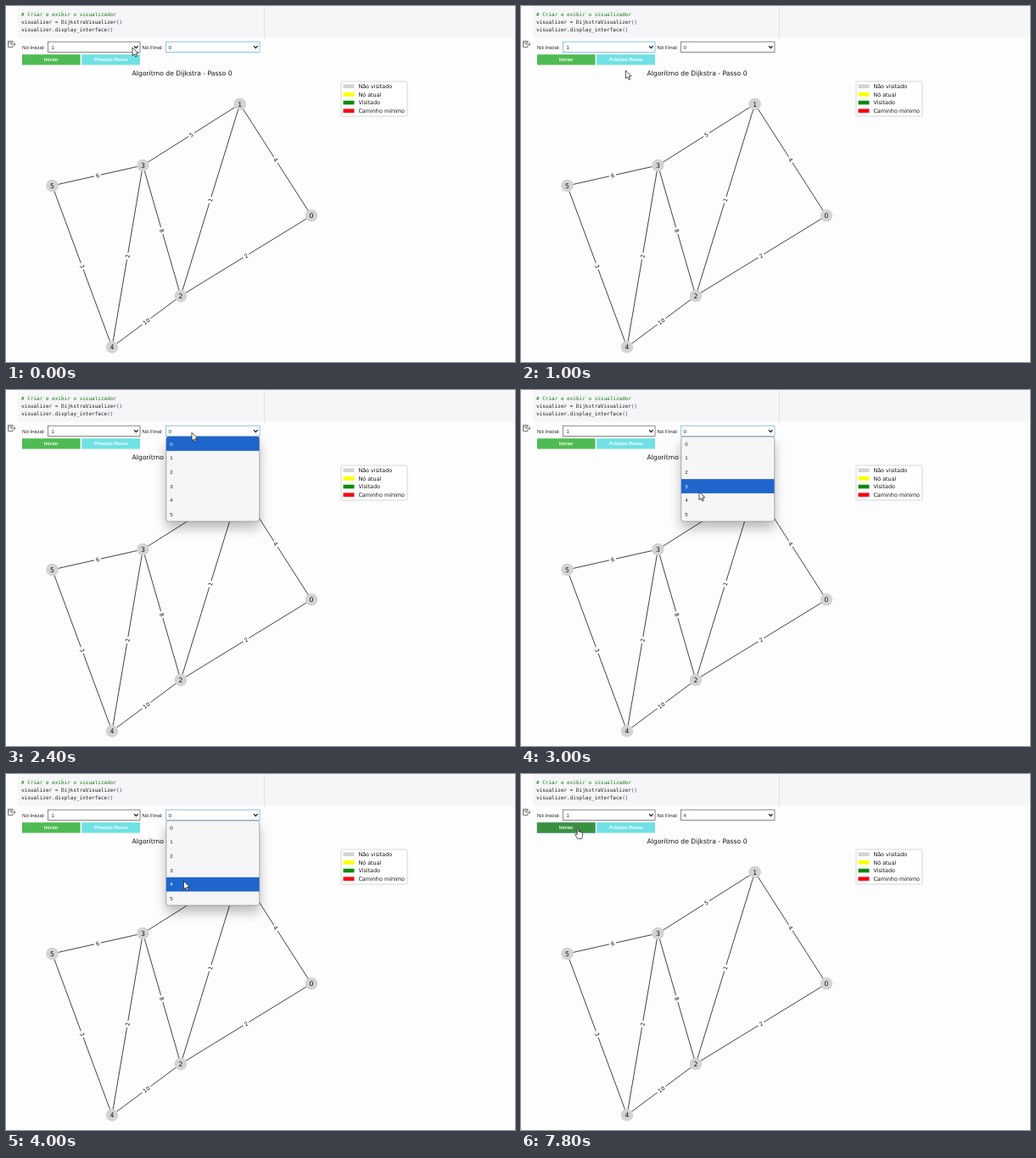
An HTML page that plays this animation: 600 px wide and 420 px high, repeating every 8 s.

```html
<!DOCTYPE html>
<html lang="pt">
<head>
<meta charset="utf-8">
<title>Algoritmo de Dijkstra</title>
<style>
  html, body { margin: 0; width: 100%; height: 100%; overflow: hidden; background: #fefdfe; }
  svg { display: block; width: 600px; height: 420px; }
  text { white-space: pre; }
  .code { font: 6px "DejaVu Sans Mono", monospace; fill: #1c1c1c; }
  .ui { font: 6.15px "Liberation Sans", Arial, sans-serif; fill: #222; }
  .label { font: bold 5.5px "Liberation Sans", Arial, sans-serif; fill: #fff; text-anchor: middle; }
  .plot { font: 7.7px "DejaVu Sans", sans-serif; fill: #111; }
  .small { font-size: 6.42px; }
  .mid { text-anchor: middle; }
  .box { fill: #fff; stroke: #6c6c6c; stroke-width: .8; }
  .box.focus { stroke: #6fb9d8; }
  .chevron { fill: none; stroke: #111; stroke-width: 1.2; }
  .icon { fill: none; stroke: #555; stroke-width: .8; }
  .menu { filter: drop-shadow(0 8px 6.5px rgba(0, 0, 0, .26)); }
  .pointer { fill: #fff; stroke: #222; stroke-width: .8; stroke-linejoin: round; }
  #start { fill: #4fbb53; }
  #start.hover { filter: drop-shadow(0 .8px .8px rgba(0, 0, 0, .45)); }
  #start.pressed { fill: #399140; stroke: #5f9f8c; stroke-width: .7; }
</style>
</head>
<body>
<svg viewBox="0 0 600 420">
  <defs>
    <clipPath id="round"><rect x="0" y="55" width="110" height="100" rx="3"/></clipPath>
  </defs>

  <rect x="14" width="586" height="37.5" fill="#f6f5f7"/>
  <path d="M304.5 0V37.5" stroke="#e2e1e4"/>
  <g class="code">
    <text x="18" y="12.2" fill="#0b800b" style="fill:#0b800b"># Criar e exibir o visualizador</text>
    <text x="18" y="21.2">visualizer = DijkstraVisualizer<tspan fill="#2a4488">()</tspan></text>
    <text x="18" y="30.2">visualizer.display_interface<tspan fill="#2a4488">()</tspan></text>
  </g>
  <path class="icon" d="M8 43V41.5H2.5V48.5H8V47M2.5 43.3H8M5 45.2H11M9.2 43.5L11 45.2L9.2 47"/>

  <g class="ui">
    <text x="19" y="50.6">Nó Inicial:</text>
    <text x="160.5" y="50.6">Nó Final:</text>
    <rect id="from" class="box" x="49.4" y="42.2" width="108.6" height="12.2"/>
    <rect id="to" class="box" x="188.4" y="42.2" width="110.6" height="12.2"/>
    <text x="53.5" y="50.6">1</text>
    <text id="goal" x="191.5" y="50.6">0</text>
    <path class="chevron" d="M151 47.2l2.3 2.5l2.3-2.5M292 47.2l2.3 2.5l2.3-2.5"/>
  </g>
  <rect id="start" x="19" y="57.2" width="68.6" height="12.3"/>
  <rect x="89.2" y="57.2" width="68.8" height="12.3" fill="#70e1e4"/>
  <text class="label" x="53.2" y="65.2">Iniciar</text>
  <text class="label" x="123.8" y="65.2">Próximo Passo</text>

  <text class="plot mid" x="207.5" y="81.6">Algoritmo de Dijkstra - Passo 0</text>
  <g id="edges"></g>
  <g id="nodes"></g>
  <rect x="395" y="89" width="78" height="41" rx="1.5" fill="#fff" stroke="#ccc" stroke-width=".8"/>
  <g id="legend"></g>

  <g id="menu" class="menu">
    <rect x="0" y="55" width="110" height="100" rx="3" fill="#f6f5f8" stroke="#8a8a8e" stroke-width=".7"/>
    <g clip-path="url(#round)"><rect id="bar" width="110" height="16.8" fill="#1f66cc"/></g>
    <g id="options" class="ui"></g>
  </g>

  <path id="arrow" class="pointer" d="M0 0V9.6L2.2 7.6L3.8 11L5.4 10.3L3.9 7L6.8 6.8Z"/>
  <path id="hand" class="pointer" d="M-.9 .8Q0-.6 .9 .8V4.6Q2-.0 2.6 5Q3.8 3.6 4.2 5.5Q5.6 4.6 5.6 6.6V9Q5.4 10.8 4.4 12.6H-.2Q-1.6 10.6-3.4 7.8Q-3.2 6.2-.9 8Z"/>
</svg>
<script>
  const $ = id => document.getElementById(id);
  const NS = "http://www.w3.org/2000/svg";

  function add(parent, tag, attrs, content = "") {
    const el = document.createElementNS(NS, tag);
    for (const key in attrs) el.setAttribute(key, attrs[key]);
    el.textContent = content;
    parent.append(el);
    return el;
  }

  // Graph: node centres and [a, b, weight]
  const nodes = [[360, 247.4], [275.7, 115.7], [206, 342], [161.4, 188], [125, 402.4], [54.5, 212]];
  const edges = [[0, 1, 4], [0, 2, 2], [1, 2, 1], [1, 3, 5], [2, 3, 8], [2, 4, 10], [3, 4, 2], [3, 5, 6], [4, 5, 3]];

  for (const [a, b] of edges) {
    const [x1, y1] = nodes[a], [x2, y2] = nodes[b];
    add($("edges"), "line", { x1, y1, x2, y2, stroke: "#222", "stroke-width": .85 });
  }
  for (const [a, b, weight] of edges) {
    const [x1, y1] = nodes[a], [x2, y2] = nodes[b];
    const angle = Math.atan((y2 - y1) / (x2 - x1)) * 180 / Math.PI;
    const g = add($("edges"), "g", { transform: `translate(${(x1 + x2) / 2} ${(y1 + y2) / 2}) rotate(${angle})` });
    const w = String(weight).length * 4.1 + 3.9;
    add(g, "rect", { x: -w / 2, y: -4.3, width: w, height: 8.6, rx: 1.8, fill: "#fefdfe" });
    add(g, "text", { class: "plot small mid", y: 2.3 }, weight);
  }
  nodes.forEach(([cx, cy], i) => {
    add($("nodes"), "circle", { cx, cy, r: 7.3, fill: "#d3d3d3" });
    add($("nodes"), "text", { class: "plot mid", x: cx, y: cy + 2.8 }, i);
  });

  const legend = [["#d3d3d3", "Não visitado"], ["#ffff00", "Nó atual"], ["#0a8a0e", "Visitado"], ["#f80510", "Caminho mínimo"]];
  legend.forEach(([fill, name], i) => {
    const y = 94.7 + i * 9.65;
    add($("legend"), "rect", { x: 397.5, y: y - 2.3, width: 13, height: 4.6, fill });
    add($("legend"), "text", { class: "plot small", x: 415.4, y: y + 2.2 }, name);
  });

  const pitch = 16.7;
  const options = nodes.map((_, i) => add($("options"), "text", { x: 4.5, y: 65.6 + i * pitch }, i));

  // Each step lists only what changes from the one before
  const steps = [
    { t: 0, x: 149, y: 49, focus: "to", menu: null, row: 1, goal: 0, start: "" },
    { t: 200, focus: "from", menu: "from" },
    { t: 400, x: 123.3, y: 76 },
    { t: 1000, menu: null },
    { t: 1400, x: 127 },
    { t: 1600, x: 160, y: 50 },
    { t: 1800, x: 176.5, y: 39 },
    { t: 2000, x: 190.5, y: 39 },
    { t: 2200, x: 219, y: 50.3 },
    { t: 2400, focus: "to", menu: "to", row: 0 },
    { t: 2600, x: 218, y: 60 },
    { t: 3000, x: 210, y: 120, row: 3 },
    { t: 3400, x: 209.5, y: 121.4 },
    { t: 3600, y: 126.3, row: 4 },
    { t: 7000, menu: null, goal: 4 },
    { t: 7400, x: 75.5, y: 85.5 },
    { t: 7600, x: 67, y: 63.7, start: "hover" },
    { t: 7800, focus: null, start: "pressed" }
  ];
  const menuX = { from: 48.7, to: 188.8 };

  function draw(now) {
    const time = now % 8000;
    const s = Object.assign({}, ...steps.filter(step => step.t <= time));
    for (const id of ["from", "to"]) $(id).classList.toggle("focus", s.focus === id);
    $("goal").textContent = s.goal;
    $("start").setAttribute("class", s.start);

    $("menu").style.display = s.menu ? "" : "none";
    $("menu").setAttribute("transform", `translate(${menuX[s.menu] || 0} 0)`);
    $("bar").setAttribute("y", 55 + s.row * pitch);
    options.forEach((el, i) => { el.style.fill = i === s.row ? "#fff" : "#222"; });

    const pointing = s.start !== "";
    $("arrow").style.display = pointing ? "none" : "";
    $("hand").style.display = pointing ? "" : "none";
    $(pointing ? "hand" : "arrow").setAttribute("transform", `translate(${s.x} ${s.y})`);
  }

  const begin = performance.now();
  function tick() {
    draw(performance.now() - begin);
    requestAnimationFrame(tick);
  }
  tick();
</script>
</body>
</html>
```
